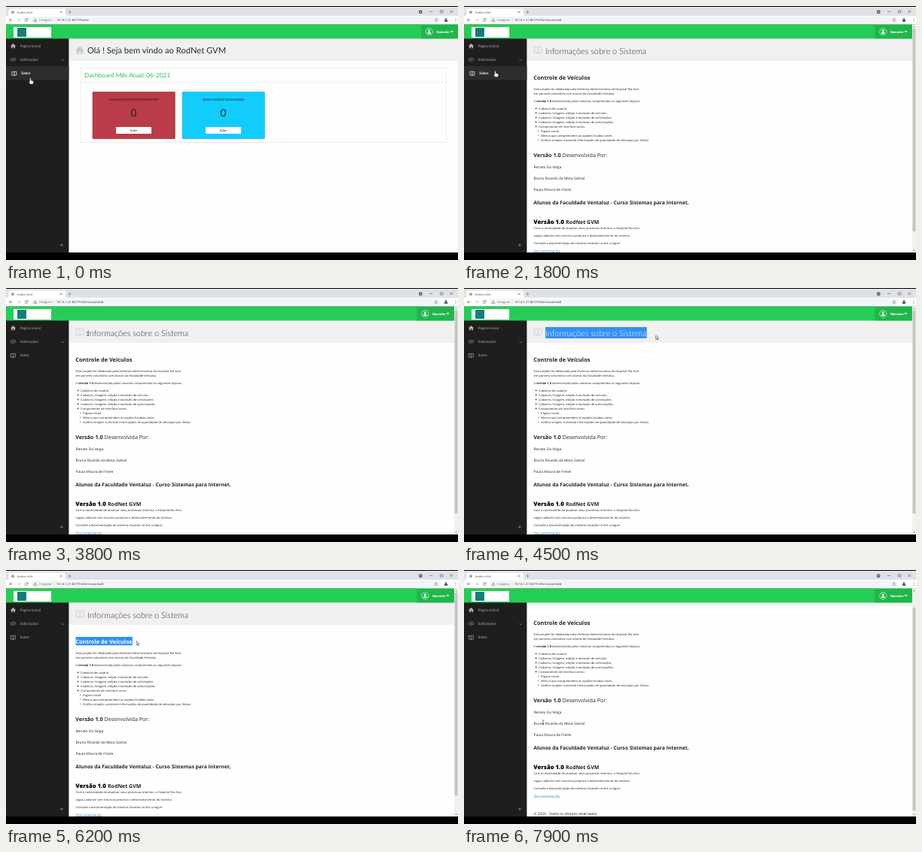
Animation of 600x338 px, one loop 8000 ms. Source, as an HTML page:

```html
<!DOCTYPE html>
<html lang="pt">
<head>
<meta charset="utf-8">
<title>RodNet GVM</title>
<style>
  html, body { margin: 0; width: 100%; height: 100%; overflow: hidden; background: #000; }
  svg { display: block; width: 100vw; height: 100vh; }
  text { white-space: pre; text-rendering: geometricPrecision; }
  .lato { font-family: Lato, sans-serif; }
  .open { font-family: "Open Sans", sans-serif; }
  .line { fill: none; stroke: currentColor; stroke-linecap: round; stroke-linejoin: round; }
</style>
</head>
<body>
<svg id="stage" viewBox="0 0 600 338">
  <defs>
    <path id="house" d="M0 3.2 3.5 0 7 3.2 6.3 3.7 6 3.4V6.2H4.2V4.2H2.8V6.2H1V3.4L.7 3.7Z"/>
    <path id="book" class="line" d="M3 .8Q1.6 -.2 0 .3V5Q1.7 4.6 3 5.6 4.3 4.6 6 5V.3Q4.4 -.2 3 .8V5.6"/>
    <clipPath id="view"><rect x="83" y="43" width="517" height="285"/></clipPath>
  </defs>
</svg>
<script>
const LOOP = 8000;
const stage = document.getElementById('stage');
const $ = id => document.getElementById(id);

const rect = (x, y, w, h, fill, extra = '') =>
  `<rect x="${x}" y="${y}" width="${w}" height="${h}" fill="${fill}" ${extra}/>`;
const text = (x, y, size, str, fill = '#262626', extra = '') =>
  `<text x="${x}" y="${y}" font-size="${size}" fill="${fill}" ${extra}>${str}</text>`;
const line = (d, color, width = .6, extra = '') =>
  `<path class="line" d="${d}" color="${color}" stroke-width="${width}" ${extra}/>`;
const bold = (str, weight = 700) => `<tspan font-weight="${weight}">${str}</tspan>`;

function card(x, fill, edge, label) {
  const mid = x + 54.5, center = 'text-anchor="middle"';
  return rect(x, 114.3, 109.4, 62.4, fill, `rx="1" stroke="${edge}" stroke-width=".5"`) +
    text(mid, 126, 4.2, label, '#1a1a1a', center) +
    text(mid, 147, 13.6, '0', '#1f1f1f', center) +
    rect(mid - 23.5, 161, 47, 9, '#fff', 'rx="1"') +
    text(mid, 167, 3.9, 'Exibir', '#222', center);
}

const home = `<g id="home" class="lato" clip-path="url(#view)">
  ${rect(83, 43, 517, 285, '#fdfdfd')}${rect(83, 43, 517, 30, '#f0f0f0')}
  <use href="#house" transform="translate(92.3 53.5) scale(1.65)" fill="#c9c9c9"/>
  ${text(108, 63, 11.2, 'Olá ! Seja bem vindo ao RodNet GVM', '#2b2b2b')}
  ${rect(99, 82.5, 485.5, 99, '#fdfdfd', 'stroke="#e6e6e6" stroke-width=".7"')}
  ${line('M99 102H584.5', '#e6e6e6', .7)}
  ${text(104, 94.5, 8.3, 'Dashboard Mês Atual: 06-2021', '#2fbe5c')}
  ${card(115, '#b93c48', '#8f2f39', 'SUAS SOLICITAÇÕES PENDENTES')}
  ${card(234, '#12cdfb', '#10a9d0', 'SUAS VIAGENS REALIZADAS')}
</g>`;

const BODY = 3.98; // size of running text

const bullets = ['Cadastro de usuário', 'Cadastro, listagem, edição e exclusão de veículos',
  'Cadastro, listagem, edição e exclusão de solicitações',
  'Cadastro, listagem, edição e exclusão de autorizações', 'Componentes de interface como:',
  'Pagina inicial', 'Menus que compreendem as opções listadas antes',
  'Gráfico simples contendo informações de quantidade de veículpos por Status'];

const bullet = (str, i) => {
  const sub = i > 4, y = 136.3 + 6 * i;
  return `<circle cx="${sub ? 98.7 : 95.6}" cy="${y}" r="${sub ? .7 : .9}" fill="${sub ? 'none' : '#222'}"
    stroke="#333" stroke-width="${sub ? .3 : 0}"/>` + text(sub ? 102 : 99, y + 1.3, BODY, str);
};

// A line of text with a selection highlight that can be widened
const selectable = (id, x, y, size, str, fill, top, h, attrs) =>
  text(x, y, size, str, fill, attrs + ` id="${id}"`) +
  `<clipPath id="${id}Clip">${rect(x, top, 0, h, '#000', `id="${id}Mask"`)}</clipPath>
  <g clip-path="url(#${id}Clip)">${rect(x, top, 300, h, '#3390f5')}${text(x, y, size, str, '#fff', attrs)}</g>`;

const info = `<g id="info" clip-path="url(#view)">
  ${rect(83, 43, 517, 285, '#fefefe')}
  <g id="doc" class="open">
    ${rect(83, 43, 512, 30, '#f0f0f0')}
    <use href="#book" transform="translate(93.2 54) scale(1.65)" color="#bdbdbd" stroke-width=".4"/>
    ${selectable('title', 108, 64, 10.85, 'Informações sobre o Sistema', '#303030', 52, 15,
      'style="font-family:Lato,sans-serif" font-weight="300"')}
    ${selectable('heading', 92.3, 97.6, 7.4, 'Controle de Veículos', '#212529', 89, 11.5, 'font-weight="700"')}
    ${text(92.5, 112.4, BODY, 'Este projeto foi idealizado pela Diretoria Administrativa do Hospital Rio Alvo')}
    ${text(92.5, 118.4, BODY, 'em parceria voluntária com alunos da Faculdade Ventaluz.')}
    ${text(92.5, 127.5, BODY, `A ${bold('versão 1.0')} desenvolvida pelos mesmos compreendia os seguintes tópicos.`)}
    ${bullets.map(bullet).join('')}
    ${text(92.3, 200.8, 7.15, `${bold('Versão 1.0')} Desenvolvida Por:`, '#212529')}
    ${['Renato Da Veiga', 'Bruno Ricardo da Mota Sobral', 'Paula Moura de Freire']
      .map((name, i) => text(92.5, 216.4 + 15 * i, 4.85, name)).join('')}
    ${text(92.3, 263.6, 6.75, 'Alunos da Faculdade Ventaluz - Curso Sistemas para Internet.', '#212529', 'font-weight="700"')}
    ${text(92.3, 289.6, 7.7, bold('Versão 1.0', 800), '#000')}
    ${text(135, 289.6, 7, 'RodNet GVM', '#212529', 'font-weight="700"')}
    ${text(92.5, 297, BODY, 'Com a necessidade de atualizar seus processos internos, o Hospital Rio Alvo')}
    ${text(92.5, 307, BODY, 'seguiu adiante com recursos próprios o desenvolvimento do sistema.')}
    ${text(92.5, 317, BODY, 'Consulte a documentação do sistema clicando no link a seguir:')}
    ${text(92.5, 328.4, 4.95, 'Documentação', '#2f7fc4')}
    ${text(92.5, 351.2, 4.8, '© 2020 - Todos os direitos reservados')}
  </g>
</g>`;

const header = `${rect(0, 24.4, 600, 19, '#25cd56')}
  ${rect(10, 28, 50, 14, '#fff')}${rect(15, 29, 12, 12, '#12807a')}
  <g id="user">
    ${rect(551, 24.4, 49, 19, '#20b64c')}
    <circle cx="561.8" cy="34.3" r="4.6" fill="none" stroke="#fff" stroke-width=".6"/>
    <circle cx="561.8" cy="33" r="1.4" fill="#fff"/><path d="M559.2 37Q559.4 34.7 561.8 34.7T564.4 37Z" fill="#fff"/>
    ${text(571.2, 36.2, 4.1, 'Operador', '#fff', 'class="lato" font-weight="900"')}
    <path d="M590 33.3H594L592 35.6Z" fill="#fff"/>
  </g>
  <g id="bar">${rect(595, 24.4, 5, 304, '#f1f1f1')}
    ${rect(595.6, 30, 3.8, 270, '#c4c4c4', 'id="thumb"')}
    <path d="M596.2 28.3 597.5 26.7 598.8 28.3ZM596.2 324.7 597.5 326.3 598.8 324.7Z" fill="#666"/></g>`;

const sidebar = `<g class="lato">
  ${rect(0, 43, 83.4, 285, '#1e1e1e')}${rect(0, 80, 83.4, 18.5, '#2d2d2d', 'id="hover"')}
  <use href="#house" x="6" y="50" fill="#b0b0b0"/>
  ${text(18.7, 54.6, 4.8, 'Pagina Inicial', '#b0b0b0')}
  ${line('M7.6 69.3 6 71.2 7.6 73.1M11.2 69.3 12.8 71.2 11.2 73.1M10 68.9 8.9 73.5', '#b0b0b0', .7)}
  ${text(18.7, 72.5, 4.7, 'Solicitações', '#b0b0b0')}
  ${line('M73.8 71.5 75.2 72.9 76.6 71.5', '#b0b0b0')}
  <g id="about"><use href="#book" x="6.3" y="87" stroke-width=".7"/>
  ${text(18.7, 91.2, 4.75, 'Sobre', 'currentColor')}</g>
  ${line('M72.4 318H75.4M73.9 316.5V319.5', '#9a9a9a', .7)}
</g>`;

const browser = `<g class="open">
  ${rect(0, 0, 600, 13.5, '#dee1e6')}${rect(0, 0, 600, 1, '#000')}
  <path d="M2 13.5Q3.5 13.5 3.5 11V6Q3.5 3.5 6 3.5H76.5Q79 3.5 79 6V11Q79 13.5 80.5 13.5Z" fill="#fff"/>
  ${rect(0, 13, 600, 11.4, '#fff')}${rect(33, 14, 544, 9.5, '#f3f4f5', 'rx="4.7"')}
  <circle id="icon" cx="9" cy="8.2" r="2" fill="#9aa0a6"/>
  <path id="spin" class="line" d="M9 10.6A2.5 2.5 0 1 1 11.5 8.1" color="#3f7ee8" stroke-width=".8"/>
  ${text(14.4, 9.6, 3.5, 'RodNet GVM', '#444')}
  ${line('M71.8 6.8 74.2 9.2M74.2 6.8 71.8 9.2M82.8 8H86.2M84.5 6.3V9.7', '#555', .5)}
  <circle cx="550.3" cy="7.8" r="2.4" fill="#4a4d50"/><path d="M549 7.2H551.6L550.3 8.9Z" fill="#fff"/>
  ${line('M562.5 7.5H566M576.8 6H580V9H576.8ZM589.8 6 592.8 9M592.8 6 589.8 9', '#333', .5)}
  ${line('M8.2 18.6H4.6M6.2 17 4.6 18.6 6.2 20.2', '#555')}
  ${line('M15.5 18.6H19M17.4 17 19 18.6 17.4 20.2', '#aaa')}
  ${line('M28.9 17.6A2 2 0 1 0 29.1 19.2M29.1 16.6V17.9H27.8', '#555', .6, 'id="reload"')}
  ${line('M25.5 17 28.7 20.2M28.7 17 25.5 20.2', '#555', .6, 'id="stop"')}
  ${line('M39 17 41 20.4H37ZM39 18.2V19.2', '#666', .5)}
  ${text(44, 20.1, 4.1, 'Inseguro', '#666')}${line('M64 16.8V20.6', '#bbb', .4)}
  ${text(67, 20.1, 4.1, '', '#333', 'id="url"')}
  ${line('M571 16.5 571.7 18 573.2 18.2 572.1 19.2 572.4 20.7 571 20 569.6 20.7 569.9 19.2 568.8 18.2 570.3 18Z', '#555', .4)}
  <circle cx="584" cy="17.4" r="1.2" fill="#444"/><path d="M581.8 20.8V18.6H586.2V20.8Z" fill="#444"/>
  ${[16.8, 18.6, 20.4].map(y => `<circle cx="597" cy="${y}" r=".5" fill="#555"/>`).join('')}
</g>`;

const cursors = `<g id="cursor">
  <path id="hand" d="M-1 .8Q0 -.6 .8 .8V3L3.6 3.8Q4.3 4.2 4 5.5L3.3 8H-.3L-2.6 5Q-2.4 3.9 -1 4.8Z"
    fill="#fff" stroke="#111" stroke-width=".5"/>
  <path id="arrow" d="M0 0V5.2L1.2 4.1 2 6 2.9 5.6 2.1 3.8H3.7Z" fill="#fff" stroke="#111" stroke-width=".5"/>
  <path id="beam" class="line" d="M-1 -2.5H1M0 -2.5V2.5M-1 2.5H1" color="#222" stroke-width=".45"/>
</g>`;

stage.insertAdjacentHTML('beforeend',
  home + info + sidebar + header + browser + cursors + rect(0, 328, 600, 10, '#000'));

// time, x, y, pointer shape
const path = [
  [0, 32.5, 96, 'hand'], [300, 28, 91, 'hand'], [400, 28, 91, 'hand'], [500, 23.5, 89, 'hand'],
  [1700, 23.5, 89, 'hand'], [1900, 60, 84, 'arrow'], [2300, 212, 64, 'beam'], [2500, 212, 64, 'beam'],
  [2600, 216.3, 62, 'beam'], [2900, 216.3, 62, 'beam'], [3000, 160, 80, 'arrow'], [3200, 160, 80, 'arrow'],
  [3300, 118, 90, 'arrow'], [3500, 118, 90, 'arrow'], [3800, 108, 61, 'beam'], [3900, 108, 61, 'beam'],
  [4200, 235, 63, 'beam'], [4400, 235, 63, 'beam'], [4500, 254.7, 63, 'arrow'], [4600, 254.7, 63, 'arrow'],
  [5100, 106, 95, 'beam'], [5400, 106, 95, 'beam'], [5500, 93, 95, 'beam'], [5800, 93, 95, 'beam'],
  [6200, 173.3, 94.5, 'arrow'], [6300, 173.3, 94.5, 'arrow'], [6500, 160, 135, 'arrow'],
  [6600, 160, 135, 'arrow'], [6800, 125, 178, 'arrow'], [6900, 125, 178, 'arrow'], [7300, 104, 200, 'beam'],
  [7400, 104, 200, 'beam'], [7500, 102, 202.5, 'beam'], [7600, 102, 202.5, 'beam'], [7700, 105, 202.5, 'beam'],
  [LOOP, 105, 202.5, 'beam']];

function pointer(t) {
  const i = path.findIndex(k => k[0] > t);
  const [t0, x0, y0, kind] = path[i - 1], [t1, x1, y1] = path[i];
  const p = (t - t0) / (t1 - t0);
  return { x: x0 + (x1 - x0) * p, y: y0 + (y1 - y0) * p, kind };
}

const show = (id, on) => $(id).setAttribute('visibility', on ? 'inherit' : 'hidden');

function select(id, t, start, full, end, x) {
  const el = $(id), all = el.getComputedTextLength() + .5;
  const dragged = Math.max(0, Math.min(all, x - el.getAttribute('x')));
  $(id + 'Mask').setAttribute('width', t < start || t >= end ? 0 : t >= full ? all : dragged);
}

function draw(time) {
  const t = Math.floor(time / 100) * 100;
  const loading = t >= 1000 && t < 1800, opened = t >= 1800, over = t < 2000;
  const { x, y, kind } = pointer(t);

  show('home', !opened);
  show('info', opened);
  show('bar', opened);
  show('spin', loading);
  show('stop', loading);
  show('icon', !loading);
  show('reload', !loading);
  show('hover', over);
  $('spin').setAttribute('transform', `rotate(${t < 1100 ? 0 : t < 1500 ? 60 : 100} 9 8.1)`);
  $('url').textContent = '10.14.1.21:8277/' + (t < 1000 ? 'home' : 'informacao/add');
  $('user').setAttribute('transform', `translate(${opened ? -5.5 : 0} 0)`);
  $('about').setAttribute('color', over ? '#fff' : '#b0b0b0');
  $('about').setAttribute('font-weight', over ? 700 : 400);
  $('about').setAttribute('transform', `translate(${over ? 1.6 : 0} 0)`);

  const p = Math.max(0, Math.min(1, (t - 7600) / 400));
  const scroll = 29.6 * p * p * (3 - 2 * p);
  $('doc').setAttribute('transform', `translate(0 ${-scroll})`);
  $('thumb').setAttribute('y', 30 + scroll * .8);

  select('title', t, 3800, 4500, 4700, x);
  select('heading', t, 5800, 6200, 6400, x);

  $('cursor').setAttribute('transform', `translate(${x} ${y})`);
  for (const id of ['hand', 'arrow', 'beam']) show(id, id === kind);
}

const begin = performance.now();
function tick() {
  draw((performance.now() - begin) % LOOP);
  requestAnimationFrame(tick);
}
tick();
</script>
</body>
</html>
```
